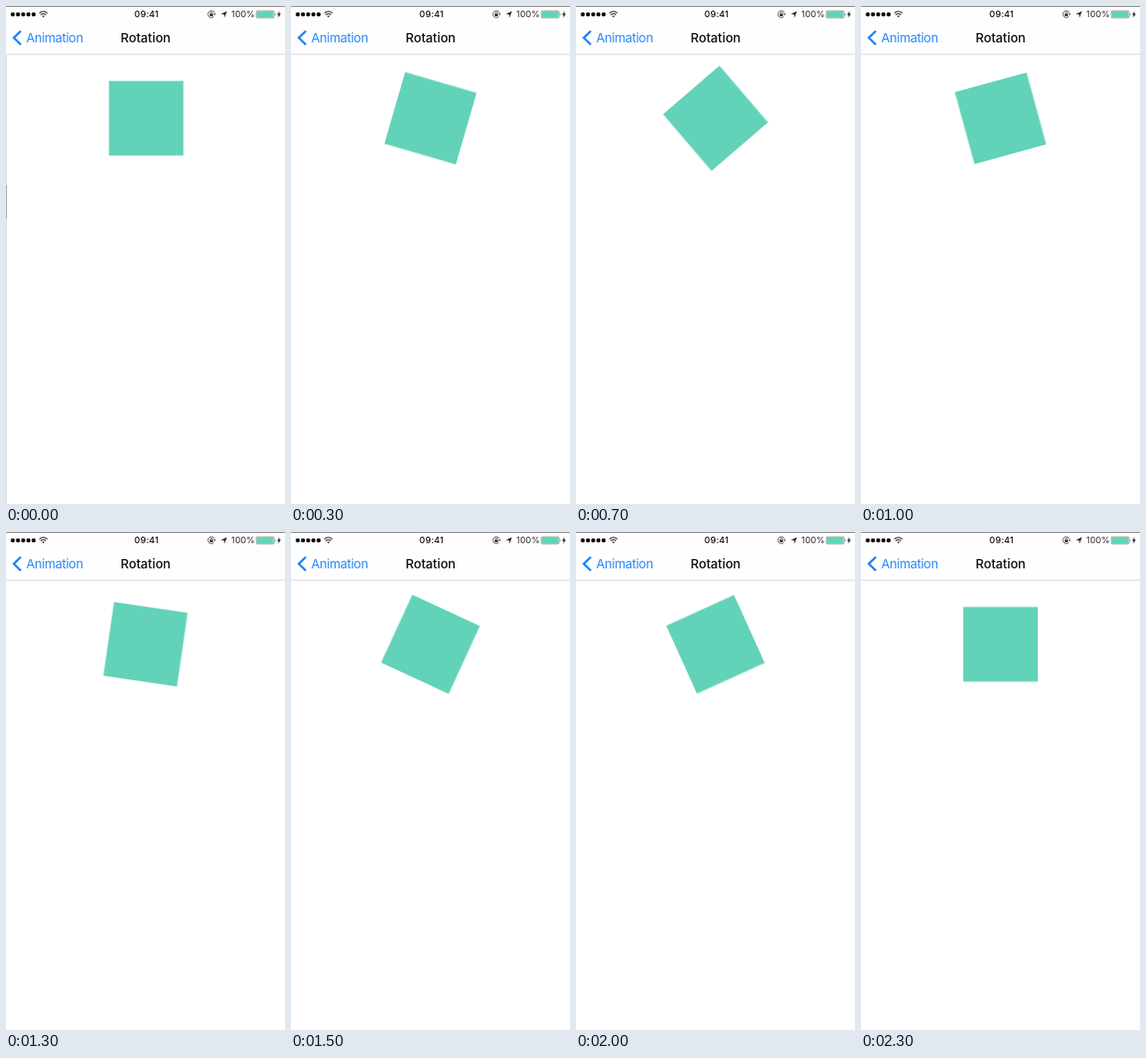
These frames come from a looping animation (300 px wide and 534 px high, 2.4 s). An HTML page:

```html
<!DOCTYPE html>
<html lang="en">
<head>
<meta charset="utf-8">
<title>Rotation</title>
<style>
  html, body { margin: 0; width: 100%; height: 100%; overflow: hidden; background: #fff; }
  svg { display: block; width: 300px; height: 534px; }
  text { font-family: Inter, Roboto, sans-serif; fill: #0a0a0a; }
  .time { font-size: 9.6px; font-weight: 500; letter-spacing: .2px; }
  .charge { font-size: 9.5px; fill: #222; }
  .bar { font-size: 13.6px; }
  .title { font-weight: 500; }
  .back { fill: #2487f8; letter-spacing: -.35px; }
  .teal { fill: #62d2b9; }

  .square { transform-origin: 150px 120.4px; animation: spin 2.4s infinite; }
  .page { animation: settle 2.4s step-end infinite; }
  .edge { animation: vanish 2.4s step-end infinite; }

  /* a near-constant half turn, advanced ten times a second */
  @keyframes spin {
    0% { transform: rotate(0); animation-timing-function: step-end; }
    4.166% { transform: rotate(0); animation-timing-function: steps(4); }
    20.833% { transform: rotate(32.4deg); animation-timing-function: steps(5); }
    41.666% { transform: rotate(74.7deg); animation-timing-function: steps(3); }
    54.166% { transform: rotate(98.3deg); animation-timing-function: steps(4); }
    70.833% { transform: rotate(131.3deg); animation-timing-function: steps(3); }
    83.333% { transform: rotate(155.6deg); animation-timing-function: steps(3); }
    95.833%, 100% { transform: rotate(180deg); }
  }
  /* last moment of the page sliding in */
  @keyframes settle {
    0% { transform: translateX(.7px); }
    4.166%, 100% { transform: none; }
  }
  @keyframes vanish {
    0% { opacity: 1; }
    4.166%, 100% { opacity: 0; }
  }
</style>
</head>
<body>
<svg viewBox="0 0 300 534">
  <g class="page">
    <rect class="square teal" x="110" y="80.4" width="80" height="80"/>
  </g>
  <g class="edge">
    <path d="M.5 52V534" stroke="#e2e2e2"/>
    <path d="M.5 192V228" stroke="#a9a9a9"/>
  </g>

  <rect width="300" height="51.3" fill="#fefefe"/>
  <rect y="51.3" width="300" height="1" fill="#d8d8d8"/>
  <rect width="300" height="1" fill="#8a8a8a"/>

  <!-- signal and wifi -->
  <path d="M7.3 9H29.8" stroke="#0a0a0a" stroke-width="4.5" stroke-linecap="round" stroke-dasharray="0 5.6"/>
  <g fill="none" stroke="#222" stroke-width="1.1">
    <path d="M35.8 7.7Q40.2 3.8 44.6 7.7"/>
    <path d="M37.4 9.5Q40.2 7.1 43 9.5"/>
  </g>
  <path d="M38.8 10.7Q40.2 9.6 41.6 10.7L40.2 12.3Z" fill="#222"/>

  <text class="time" x="151.1" y="12.4" text-anchor="middle">09:41</text>

  <!-- rotation lock -->
  <g fill="none" stroke="#333" stroke-width=".8">
    <path d="M224.2 7.4A3.7 3.7 0 1 0 223.4 11.4"/>
    <path d="M219.7 8.7V7.8a1.1 1.1 0 0 1 2.2 0V8.7"/>
  </g>
  <path d="M223 8.2H225.7L224.4 10Z" fill="#333"/>
  <rect x="219.1" y="8.5" width="3.4" height="2.4" fill="#222"/>
  <!-- location -->
  <path d="M237.6 5.5L234.9 12.7L234.5 9.1L231 8.8Z" fill="#222"/>

  <text class="charge" x="267.5" y="12.4" text-anchor="end">100%</text>

  <!-- battery -->
  <rect x="269.2" y="5.2" width="19" height="7.6" rx="1.2" fill="#fff" stroke="#333" stroke-width=".5"/>
  <rect class="teal" x="269.9" y="5.9" width="17.6" height="6.2" rx=".6"/>
  <path d="M289 7.7Q290.3 9 289 10.3Z" fill="#333"/>
  <path d="M294.4 5.3L291.4 9.5H293.2L292.5 12.7L295.6 8.3H293.7Z" fill="#222"/>

  <path d="M16 26.7L8.4 34.1L16 41.5" fill="none" stroke="#1a7ffa" stroke-width="2.3"/>
  <text class="bar back" x="21.8" y="39">Animation</text>
  <text class="bar title" x="150.2" y="39" text-anchor="middle">Rotation</text>
</svg>
</body>
</html>
```
